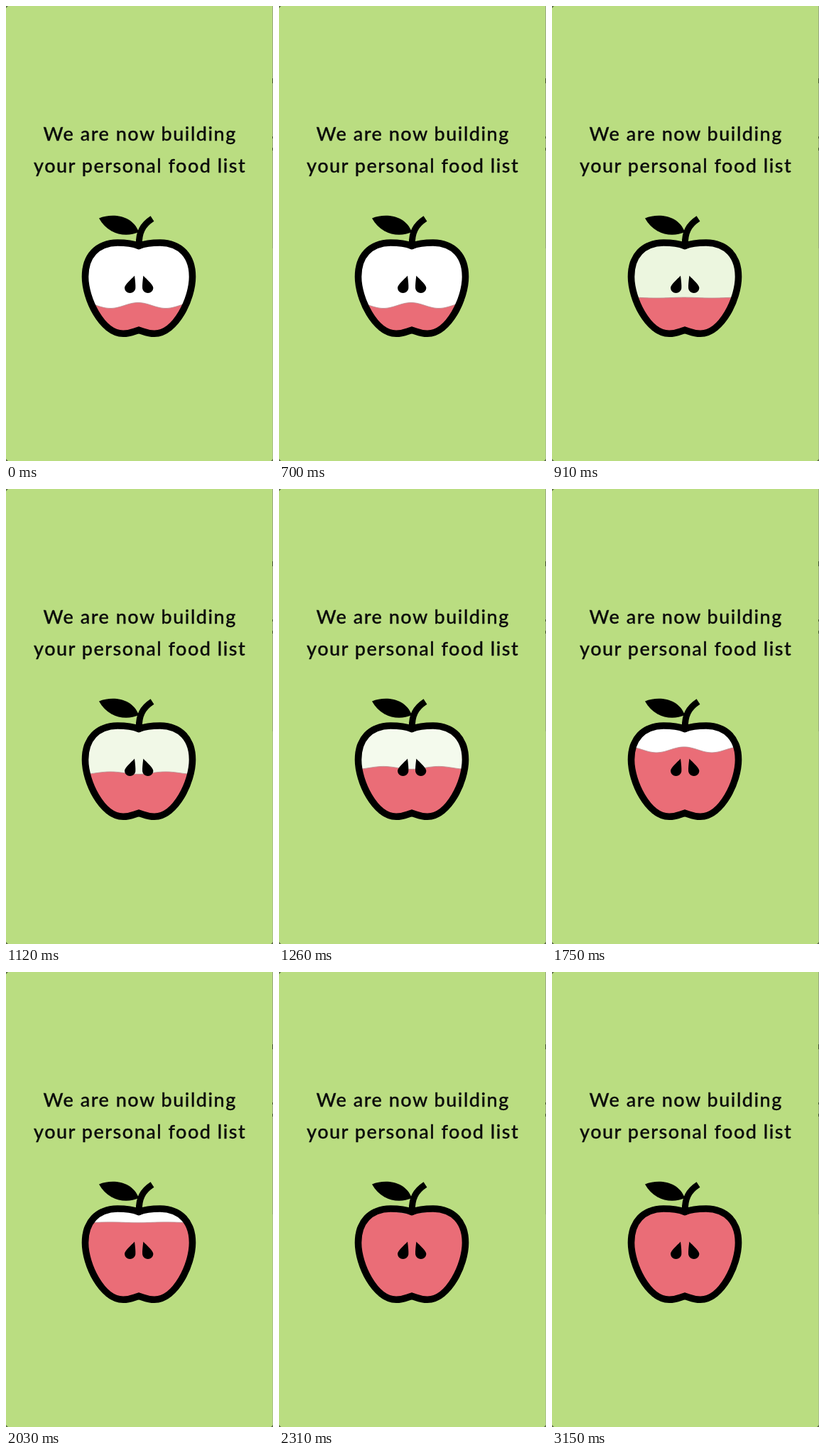
These frames come from a looping animation (376x642 px, 3.29 s). An HTML page:

```html
<!DOCTYPE html>
<html lang="en">
<head>
<meta charset="utf-8">
<title>Building your food list</title>
<style>
html, body { margin: 0; width: 100%; height: 100%; overflow: hidden; background: #badd81; }
svg { display: block; width: 376px; height: 642px; }
text {
  font: 500 27px Lato, "Open Sans", sans-serif;
  letter-spacing: 1.5px;
  text-anchor: middle;
  fill: #0b0b0b;
  stroke: #0b0b0b;
  stroke-width: .3;
}
</style>
</head>
<body>
<svg viewBox="0 0 376 642">
  <defs>
    <path id="half" d="M187 338.5 C177 334.5 167 334 157 334 C128 334.5 111.5 353 111.5 382
      C111.5 413 135 462 165 462.3 C176 462.3 180 459 187 457.3"/>
    <g id="apple">
      <use href="#half"/>
      <use href="#half" transform="translate(374) scale(-1 1)"/>
    </g>
    <clipPath id="inside">
      <use href="#half"/>
      <use href="#half" transform="translate(374) scale(-1 1)"/>
    </clipPath>
    <path id="seed" d="M181 380.5 C182 388 182.6 394 182.3 398.5 A7.7 7.7 0 0 1 167 398 C167 393 176 386 181 380.5Z"/>
  </defs>
  <rect width="376" height="642" fill="#badd81"/>

  <!-- screen edge -->
  <path d="M375.5 0V342" stroke="#9aaa80"/>
  <path d="M375.5 342V642" stroke="#abc288"/>
  <path d="M375.5 102v7M375.5 184v3M375.5 200v4" stroke="#45503a"/>
  <path d="M0 0H3L0 3ZM0 642H3L0 639ZM376 642H373L376 639Z" fill="#5d6b48"/>

  <text x="188.7" y="190">We are now building</text>
  <text x="188.7" y="235">your personal food list</text>

  <rect id="flesh" x="100" y="320" width="174" height="160" clip-path="url(#inside)"/>
  <path id="juice" clip-path="url(#inside)" fill="#ea6d77" stroke="#b98f92" stroke-width=".8"/>
  <use href="#apple" fill="none" stroke="#000" stroke-width="9.6" stroke-linecap="round"/>
  <path d="M131 299.5 C150 292 178 295 187 319 C169 327 144 323 131 299.5Z"/>
  <path d="M187.3 337 C187 320 192 309 206 300" fill="none" stroke="#000" stroke-width="9"/>
  <use href="#seed"/>
  <use href="#seed" transform="translate(374.4) scale(-1 1)"/>
</svg>
<script>
const LOOP = 3290, STEP = 70, HOLD = 700, SWAY = 1050;
const flesh = document.getElementById("flesh");
const juice = document.getElementById("juice");

function surface(level, height) {
  let d = "M100 480";
  for (let x = 100; x <= 274; x += 2) {
    const y = level - height * Math.cos((x - 186) * 2 * Math.PI / 78);
    d += `L${x} ${y.toFixed(2)}`;
  }
  return d + "L274 480Z";
}

// After a pause the juice rises steadily while its wave sways.
function draw(ms) {
  const t = Math.floor(ms % LOOP / STEP) * STEP;
  const rise = Math.max(0, t - HOLD);
  const level = 422.5 - rise * 0.052;
  const height = 4 - 6 * Math.abs(Math.sin(Math.PI * rise / SWAY));
  const shade = rise ? 10 * Math.max(0, 1 - rise / SWAY) : 0;
  juice.setAttribute("d", surface(level, height));
  flesh.setAttribute("fill", `hsl(85, 55%, ${100 - shade}%)`);
}

let start;
function tick(now) {
  start ??= now;
  draw(now - start);
  requestAnimationFrame(tick);
}
draw(0);
requestAnimationFrame(tick);
</script>
</body>
</html>
```
